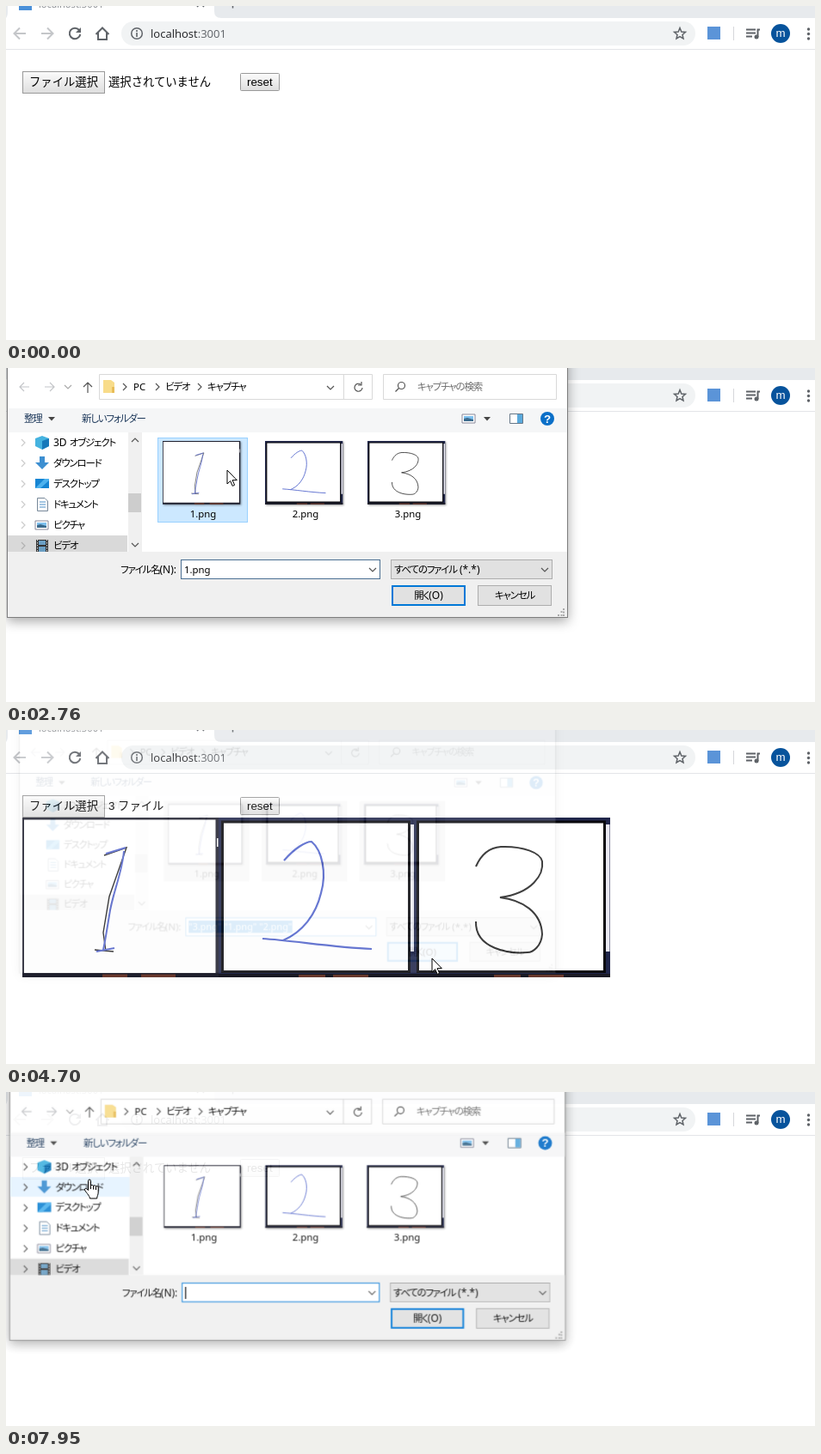
An HTML page for the animation above (8 s loop, 940 by 389 pixels).

```html
<!DOCTYPE html>
<html lang="ja">
<head>
<meta charset="utf-8">
<title>File picker</title>
<style>
html, body { margin: 0; width: 100%; height: 100%; overflow: hidden; background: #fff; }
svg { display: block; }
text { font: 13.33px "Liberation Sans", "Noto Sans CJK JP", sans-serif; }
.url { font: 13.05px "Open Sans", sans-serif; }
.ui { font: 11.5px "Noto Sans", "Noto Sans CJK JP", sans-serif; font-feature-settings: "palt"; letter-spacing: -1.2px; }
.latin { font-size: 12px; letter-spacing: 0; }
.name { font: 11.4px "Noto Sans", sans-serif; }
.mid { text-anchor: middle; }
.line { fill: none; stroke: #5f6368; stroke-width: 2; }
.fine { stroke-width: 1.5; }
.thin { fill: none; stroke: #555; stroke-width: 1.2; }
.pale { stroke: #c4c6c9; }
.btn { fill: url(#face); stroke: #999; }

/* Hard state changes */
.state, .state > * { animation: 8s step-end infinite; }
#strip { animation-name: strip; }
#fileBtn { animation-name: fileBtn; }
#resetBtn { animation-name: resetBtn; }
#none { animation-name: none-chosen; }
#chosen { animation-name: chosen; }
#pick1 { animation-name: pick1; }
#pick2 { animation-name: pick2; }
#pick3 { animation-name: pick3; }
#name1 { animation-name: name1; }
#name2 { animation-name: name2; }
#name3 { animation-name: name3; }
#marked { animation-name: marked; }
#caret { animation-name: caret; }
#field { animation-name: field; }
#row1 { animation-name: row1; }
#row2 { animation-name: row2; }
#combo { animation-name: combo; }
#open { animation-name: open; }
#hand { animation-name: hand; }
#arrow { animation-name: arrow; }
@keyframes strip { 0%, 21%, 98% { fill: #e7eaed } 17.2%, 59.7% { fill: #dee1e6 } }
@keyframes fileBtn { 0%, 18.8%, 95% { fill: url(#face) } 16.3%, 93.5% { fill: url(#pressed) } }
@keyframes resetBtn { 0%, 82% { fill: url(#face) } 80.1% { fill: url(#pressed) } }
@keyframes none-chosen { 0%, 83% { opacity: 1 } 57.5% { opacity: 0 } }
@keyframes chosen { 0%, 83% { opacity: 0 } 57.5% { opacity: 1 } }
@keyframes pick1 {
  0%, 60% { opacity: 0 }
  27.5% { opacity: 1; fill: #e5f3ff; stroke: none }
  31.6% { opacity: 1; fill: #cce8ff; stroke: #99d1ff }
  39.4% { opacity: 1; fill: #cce8ff; stroke: none }
  55.6% { opacity: 1; fill: #d9d9d9; stroke: none }
}
@keyframes pick2 {
  0%, 60% { opacity: 0 }
  36.2% { opacity: 1; fill: #e5f3ff; stroke: none }
  39.4% { opacity: 1; fill: #cce8ff; stroke: #99d1ff }
  44% { opacity: 1; fill: #cce8ff; stroke: none }
  55.6% { opacity: 1; fill: #d9d9d9; stroke: none }
}
@keyframes pick3 {
  0%, 60% { opacity: 0 }
  41.9% { opacity: 1; fill: #e5f3ff; stroke: none }
  44% { opacity: 1; fill: #cce8ff; stroke: #99d1ff }
  55.6% { opacity: 1; fill: #d9d9d9; stroke: none }
}
@keyframes name1 { 0%, 39.4% { opacity: 0 } 31.6% { opacity: 1 } }
@keyframes name2 { 0%, 44% { opacity: 0 } 39.4% { opacity: 1 } }
@keyframes name3 { 0%, 60% { opacity: 0 } 44% { opacity: 1; fill: #000 } 55.6% { opacity: 1; fill: #fff } }
@keyframes marked { 0%, 60% { opacity: 0 } 55.6% { opacity: 1 } }
@keyframes caret { 0%, 60% { opacity: 1 } 31.6% { opacity: 0 } }
@keyframes field { 0%, 55.6% { stroke: #0078d7 } 31.6% { stroke: #4a6f92 } }
@keyframes row1 { 0% { opacity: 1 } 25.6% { opacity: 0 } }
@keyframes row2 { 0% { opacity: 0 } 98% { opacity: 1 } }
@keyframes combo { 0%, 53.2% { fill: #e1e1e1; stroke: #adadad } 51.9% { fill: #e5f1fb; stroke: #0078d7 } }
@keyframes open { 0%, 60% { fill: #e1e1e1 } 54% { fill: #e5f1fb } 56% { fill: #cce4f7 } }
@keyframes hand { 0%, 24% { opacity: 0 } 9%, 90.7% { opacity: 1 } }
@keyframes arrow { 0%, 24% { opacity: 1 } 9%, 90.7% { opacity: 0 } }

/* Movement */
#dialog { transform-origin: 327px 110px; animation: dialog 8s linear infinite; }
#expand { animation: expand 8s linear infinite; }
#cursor { animation: cursor 8s ease-in-out infinite; }
@keyframes dialog {
  0%, 20.94% { opacity: 0; transform: scale(.91) }
  20.95% { opacity: 0; transform: scale(.91); animation-timing-function: cubic-bezier(.333, .667, .667, 1) }
  23.45%, 57.25% { opacity: 1; transform: scale(1) }
  59% { opacity: 0; transform: scale(.95) }
  98% { opacity: 0; transform: scale(.91); animation-timing-function: cubic-bezier(.333, .667, .667, 1) }
  100% { opacity: 1; transform: scale(1) }
}
@keyframes expand { 0%, 27% { opacity: 1 } 34.5% { opacity: .3 } 40%, 60% { opacity: 0 } 61%, 100% { opacity: 1 } }
@keyframes cursor {
  0%, 3.4% { transform: translate(790px, 400px); animation-timing-function: ease-out }
  12.25%, 18.1% { transform: translate(79px, 85px) }
  22.9% { transform: translate(81px, 95px) }
  24% { transform: translate(84px, 96px) }
  29.6%, 34.5% { transform: translate(257px, 119px) }
  38.2%, 40% { transform: translate(365px, 128px) }
  43.1%, 48% { transform: translate(457px, 141px) }
  55%, 69.5% { transform: translate(495px, 266px) }
  79.1%, 86% { transform: translate(302px, 95px) }
  89.75% { transform: translate(131px, 94px) }
  92.5%, 96% { transform: translate(95px, 92px) }
  99.3%, 100% { transform: translate(97px, 102px) }
}
</style>
</head>
<body>
<svg width="940" height="389" viewBox="0 0 940 389">
<defs>
  <linearGradient id="face" x2="0" y2="1"><stop stop-color="#fbfbfb"/><stop offset="1" stop-color="#dedede"/></linearGradient>
  <linearGradient id="pressed" x2="0" y2="1"><stop stop-color="#d6d6d6"/><stop offset="1" stop-color="#f4f4f4"/></linearGradient>
  <path id="right" class="thin" d="M-2-4L2 0L-2 4"/>
  <path id="down" class="thin" d="M-4-2L0 2L4-2"/>
  <path id="drop" d="M-4-2H4L0 2.5Z" fill="#444"/>
  <g id="photo">
    <path fill="#fff" stroke="#889" d="M-8-5H7V5H-8Z"/>
    <path fill="#7ec0ee" d="M-6-3H5V1H-6Z"/><path fill="#3b6a8c" d="M-6 3V0L-2-1L5 1V3Z"/>
  </g>
  <g id="shot1">
    <path fill="#20212f" d="M0 0H228V186H0Z"/>
    <path fill="#fff" d="M2 2.500H224.500V181H2ZM226 24H227.500V34H226Z"/>
    <path fill="#6b3a2e" d="M93 182.500H122V186H93ZM138 182.500H178V186H138Z"/>
    <g fill="none">
      <path stroke="#222" stroke-width="1.400" d="M95 44L121 35L101 92L94 134L97 156M84 154L106 156"/>
      <path stroke="#5566cc" stroke-width="2" d="M97 42L120 35M118 39C116 65 104 90 101 114C98 132 96 145 94 154M86 156L107 152"/>
    </g>
  </g>
  <g id="frame">
    <path fill="#20264a" d="M0 0H228V186H0Z"/>
    <path fill="#e9e9f2" d="M223 8H227.500V156H223Z"/>
    <path fill="#1a1a24" d="M0 182H228V186H0Z"/>
    <path fill="#fff" stroke="#08080c" stroke-width="3" d="M4.500 5H221.500V179.500H4.500Z"/>
    <path fill="#6b3a2e" d="M93 183H124V186H93ZM133 183H174V186H133Z"/>
  </g>
  <g id="shot2">
    <use href="#frame"/>
    <path fill="none" stroke="#5164cc" stroke-width="2.200" d="M76 50C88 36 101 28 108 28C120 38 126 64 119 88C113 113 98 133 75 143M51 141C85 143 133 151 178 153"/>
  </g>
  <g id="shot3">
    <use href="#frame"/>
    <path fill="none" stroke="#222" stroke-width="2" d="M72 57C78 43 88 35 101 34C127 33 147 41 149 51C151 66 138 88 100 93C126 96 148 110 149 136C148 150 138 157 132 157C111 159 71 153 72 121"/>
  </g>
</defs>

<g id="browser">
  <rect class="state" id="strip" width="940" height="14"/>
  <path fill="#fff" d="M0 14Q2 12 2 6V0H242V6Q242 14 250 14V51H0Z"/>
  <path fill="#fff" d="M0 14H940V50H0Z"/>
  <path fill="#e3e5e8" d="M0 50H940V51H0Z"/>
  <rect x="15" y="-10" width="15" height="15" fill="#4a90d9"/>
  <text x="38" y="2" class="url" style="font-size:11.2px" fill="#85888c">localhost:3001</text>
  <path class="line fine" d="M222-7L230 1M222 1L230-7M263.500-7V2.500"/>
  <path class="line pale" d="M23 32H10M16 25.500L9.500 32L16 38.500M41 32H54M48 25.500L54.500 32L48 38.500"/>
  <path class="line" d="M85 28A6.300 6.300 0 1 0 86.300 33"/>
  <path fill="#5f6368" d="M87 25V31H81Z"/>
  <path class="line" d="M104.500 33L112 25.500L119.500 33M107 31V39H117V31"/>
  <rect x="134" y="18" width="667" height="28" rx="14" fill="#f1f3f4"/>
  <circle class="line fine" cx="152" cy="32" r="6.300"/>
  <path fill="#5f6368" d="M151.200 28H152.800V30H151.200ZM151.200 31H152.800V36H151.200Z"/>
  <text x="168" y="37" class="url" fill="#202124">localhost<tspan fill="#5f6368">:3001</tspan></text>
  <path class="line fine" d="M783 25.500L784.800 30L789.500 30.400L786 33.500L787 38L783 35.600L779 38L780 33.500L776.500 30.400L781.200 30Z"/>
  <rect x="815" y="24" width="15" height="15" fill="#5b94d8"/>
  <path fill="#d5d7da" d="M845 24H846V40H845Z"/>
  <path class="line" d="M860 27.500H871M860 31.500H871M860 35.500H867M873.500 36V27.500H876"/>
  <circle cx="872" cy="36" r="2.500" fill="#5f6368"/>
  <circle cx="900" cy="32" r="11" fill="#07539c"/>
  <text class="mid" x="900" y="36" fill="#fff">m</text>
  <g fill="#5f6368"><circle cx="932.500" cy="27" r="1.700"/><circle cx="932.500" cy="32.500" r="1.700"/><circle cx="932.500" cy="38" r="1.700"/></g>
</g>

<g id="page">
  <rect class="state btn" id="fileBtn" x="19.500" y="76.500" width="95" height="25"/>
  <text x="27" y="93">ファイル選択</text>
  <rect class="state btn" id="resetBtn" x="272.500" y="78.500" width="45" height="20" rx="1"/>
  <text x="280" y="93">reset</text>
  <text class="state" id="none" x="119" y="93">選択されていません</text>
  <g class="state" id="chosen">
    <text x="119" y="93">3 ファイル</text>
    <use href="#shot1" x="19" y="102"/>
    <use href="#shot2" x="247" y="102"/>
    <use href="#shot3" x="474" y="102"/>
  </g>
</g>

<g id="dialog">
  <rect x="1.500" y="-70" width="651" height="360.500" fill="#fff" stroke="#7d7d7d" style="filter:drop-shadow(0 4px 7px rgba(0,0,0,.35))"/>
  <path fill="#f5f6f7" d="M2 47H652V75H2Z"/>
  <path fill="#f0f0f0" d="M2 214H652V290H2Z"/>

  <path class="thin pale" d="M27 22H16M21 17L16 22L21 27M45 22H56M51 17L56 22L51 27"/>
  <use href="#down" x="72" y="22" opacity=".5"/>
  <path class="thin fine" d="M95 29V17M90 22L95 17L100 22"/>
  <path fill="#fff" stroke="#d9d9d9" d="M108.500 7.500H425.500V36.500H108.500ZM392.500 7.500V36.500M438.500 7.500H639.500V36.500H438.500Z"/>
  <path fill="#f8dc8a" d="M113 14H122L126 17V29H113Z"/><path fill="#e8bd58" d="M123 22H126V29H123Z"/>
  <use href="#right" x="138" y="22"/><use href="#right" x="176" y="22"/><use href="#right" x="225" y="22"/>
  <text class="name latin" x="148" y="26">PC</text>
  <text class="ui" x="185" y="26">ビデオ</text>
  <text class="ui" x="234" y="26">キャプチャ</text>
  <use href="#down" x="377" y="23"/>
  <path class="thin" d="M412 19A4.500 4.500 0 1 0 414 23M413 16V20H409"/>
  <circle class="thin" cx="459.500" cy="20.500" r="4"/><path class="thin" d="M456.500 23.500L452.500 27.500"/>
  <text class="ui" x="478" y="26" fill="#6d6d6d">キャプチャの検索</text>

  <g fill="#1e395b"><text class="ui" x="21" y="63">整理</text><text class="ui" x="88" y="63">新しいフォルダー</text></g>
  <use href="#drop" x="53" y="59"/><use href="#drop" x="559" y="59"/>
  <use href="#photo" x="538" y="59"/>
  <path fill="#fff" stroke="#678" d="M585.500 53.500H600.500V64.500H585.500Z"/><path fill="#5aa9dc" d="M594 54H600V64H594Z"/>
  <circle cx="629" cy="59" r="8" fill="#0a6fc8"/>
  <text class="mid" x="629" y="63.500" fill="#fff" style="font-weight:bold">?</text>

  <g class="state" fill="#e5f3ff">
    <path id="row1" d="M2 75H142V98H2Z"/>
    <path id="row2" d="M2 99H142V122H2Z"/>
  </g>
  <path fill="#d9d9d9" d="M2 195H141V214H2Z"/>
  <g id="expand">
    <use href="#right" x="20" y="87"/><use href="#right" x="20" y="111"/><use href="#right" x="20" y="135"/>
    <use href="#right" x="20" y="159"/><use href="#right" x="20" y="183"/><use href="#right" x="20" y="207"/>
  </g>
  <path fill="#45b3e0" d="M34 82L42 79L50 82V91L42 95L34 91Z"/><path fill="#1779ba" d="M42 85L50 82V91L42 95Z"/>
  <path fill="#3d8fd1" d="M39 103H45V110H50L42 118L34 110H39Z"/>
  <path fill="#1685d3" d="M34 129H50V140H34Z"/><path fill="#4db2ee" d="M34 140L45 129H50V131L40 140Z"/>
  <path fill="#fff" stroke="#789" d="M36.500 151.500H45L48.500 155V166.500H36.500Z"/>
  <path stroke="#4a8ec6" d="M39 156H46M39 159H46M39 162H46"/>
  <use href="#photo" x="42" y="183"/>
  <path fill="#333" d="M35 200H49V214H35Z"/><path fill="#6b9fc4" d="M38 201H46V206H38ZM38 208H46V214H38Z"/>
  <path stroke="#ddd" stroke-dasharray="1.500 1.500" d="M36.500 200V214M47.500 200V214"/>
  <text class="ui" x="55" y="91"><tspan class="latin">3D </tspan>オブジェクト</text>
  <text class="ui" x="55" y="115">ダウンロード</text>
  <text class="ui" x="55" y="139">デスクトップ</text>
  <text class="ui" x="55" y="163">ドキュメント</text>
  <text class="ui" x="55" y="187">ピクチャ</text>
  <text class="ui" x="55" y="211">ビデオ</text>
  <path fill="#f0f0f0" d="M142 75H158V214H142Z"/><path fill="#cdcdcd" d="M142 146H157V168H142Z"/>
  <use href="#down" x="150" y="206"/><use href="#down" transform="translate(150 84) scale(1 -1)"/>

  <g class="state">
    <rect id="pick1" x="176.500" y="81.500" width="104" height="98"/>
    <rect id="pick2" x="295.500" y="81.500" width="104" height="98"/>
    <rect id="pick3" x="414.500" y="81.500" width="104" height="98"/>
  </g>
  <g style="filter:drop-shadow(1px 1px 1px rgba(0,0,0,.4))">
    <use href="#shot1" transform="translate(182 85) scale(.396)"/>
    <use href="#shot2" transform="translate(301 85) scale(.396)"/>
    <use href="#shot3" transform="translate(420 85) scale(.396)"/>
  </g>
  <text class="name mid" x="229" y="174">1.png</text>
  <text class="name mid" x="348" y="174">2.png</text>
  <text class="name mid" x="467" y="174">3.png</text>

  <text class="ui" x="198" y="239" text-anchor="end">ファイル名<tspan class="latin">(N):</tspan></text>
  <rect class="state" id="field" x="203.500" y="223.500" width="231" height="22" fill="#fff"/>
  <g class="state">
    <path id="marked" fill="#0078d7" d="M207 227H333V242H207Z"/>
    <path id="caret" d="M207 228H208.200V242H207Z"/>
    <text id="name1" class="name" x="207" y="239">1.png</text>
    <text id="name2" class="name" x="207" y="239">"2.png" "1.png"</text>
    <text id="name3" class="name" x="207" y="239">"3.png" "1.png" "2.png"</text>
  </g>
  <use href="#down" x="426" y="235"/>
  <rect class="state" id="combo" x="447.500" y="223.500" width="187" height="22"/>
  <text class="ui" x="451" y="239">すべてのファイル<tspan class="latin"> (*.*)</tspan></text>
  <use href="#down" x="626" y="235"/>
  <rect class="state" id="open" x="449" y="254" width="84" height="22" stroke="#0078d7" stroke-width="2"/>
  <text class="ui mid" x="491" y="269">開く<tspan class="latin">(O)</tspan></text>
  <rect x="548.500" y="253.500" width="85" height="23" fill="#e1e1e1" stroke="#adadad"/>
  <text class="ui mid" x="591" y="269">キャンセル</text>
  <path fill="none" stroke="#aaa" stroke-width="2" stroke-dasharray="2 1.500" d="M648 280V289M641 288H648M644.500 284H648"/>
</g>

<g id="cursor">
  <g class="state" fill="#fff" stroke="#000" stroke-linejoin="round">
    <path id="arrow" d="M0 0V16L3.700 12.600L6.200 18.400L8.600 17.300L6.100 11.600H11.300Z"/>
    <path id="hand" d="M-1.500 1.500a1.500 1.500 0 0 1 3 0V7.500a1.500 1.400 0 0 1 3 .4a1.500 1.400 0 0 1 3 .6a1.400 1.300 0 0 1 2.700 .6V15c0 3-1.500 4-1.500 7H.5C.5 19-5 14-5.500 12c-.5-2 1.800-2.400 4 .5ZM1.500 7.500V11M4.500 8V11.500M7.500 8.500V12"/>
  </g>
</g>
</svg>
</body>
</html>
```
